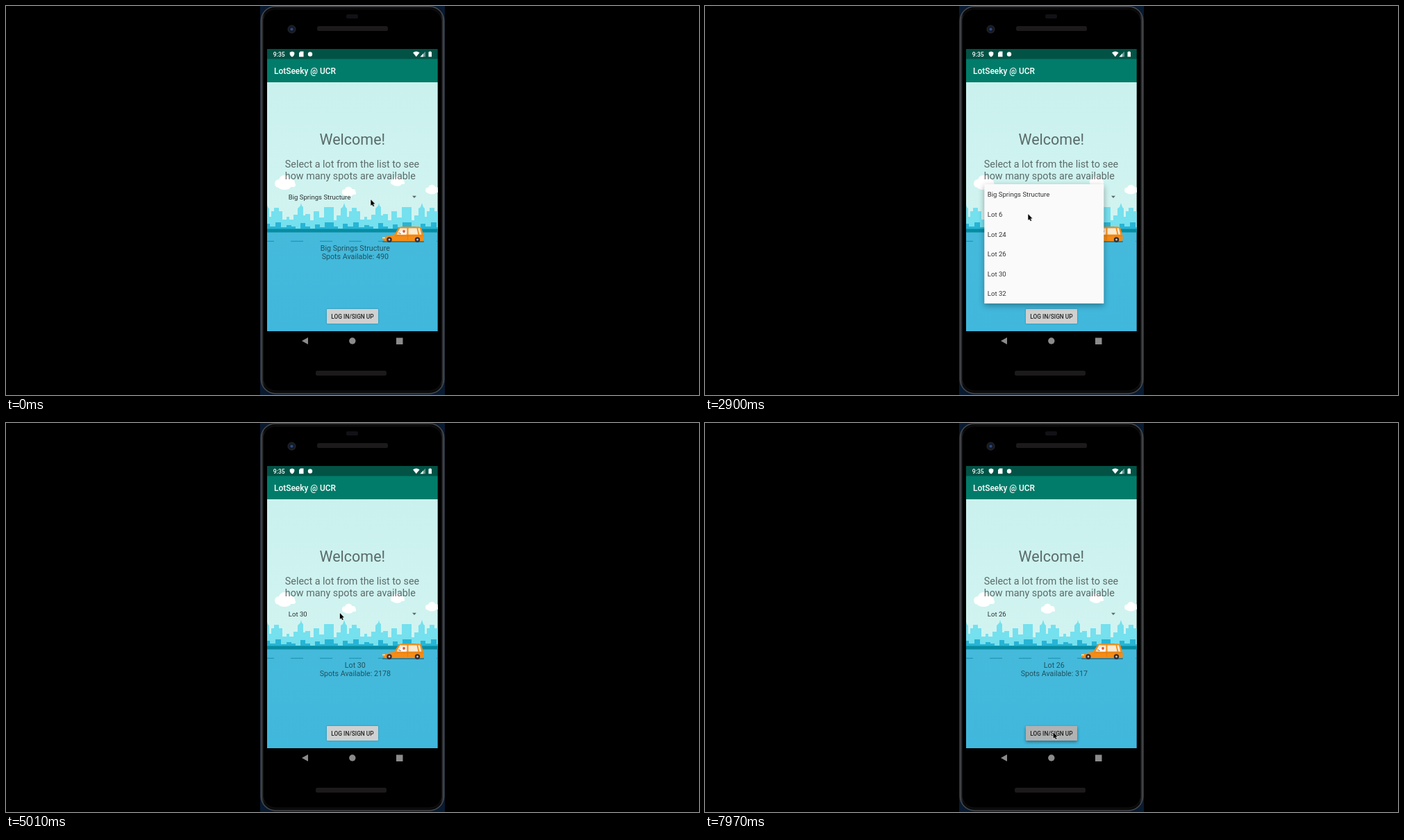
Animation of 998 by 561 pixels, one loop 8 s. Source, as an HTML page:

```html
<!DOCTYPE html>
<html lang="en">
<head>
<meta charset="utf-8">
<title>Parking lot picker</title>
<style>
  html, body { margin: 0; width: 100%; height: 100%; overflow: hidden; background: #000; }
  svg { display: block; width: 100vw; height: 100vh; }
  text { font-family: Roboto, sans-serif; white-space: pre; }
  .soft { fill: rgba(0,0,0,.56); }
  .ink { fill: rgba(0,0,0,.8); font-size: 9.57px; }
  .medium { font-weight: 500; }
  .heading { font-size: 21.5px; }
  .intro { font-size: 14.33px; }
  .result { font-size: 10.7px; text-anchor: middle; }

  .cursor, .popup, .sheet, .rows, .ripple, .button, .pick, .count {
    animation: 8s linear infinite;
  }

  .cursor { animation-name: cursor; animation-timing-function: ease-in-out; }
  @keyframes cursor {
    0%, 5% { transform: translate(525.3px, 279px); }
    19%, 25% { transform: translate(504.3px, 274px); }
    33%, 37% { transform: translate(465.3px, 300px); }
    44.5%, 48.2% { transform: translate(458px, 320px); }
    51.5%, 52.8% { transform: translate(478px, 275px); }
    56%, 57.2% { transform: translate(461px, 383px); }
    62.3%, 67% { transform: translate(480.8px, 274px); }
    76%, 82% { transform: translate(466.2px, 348px); }
    95%, 100% { transform: translate(501.6px, 446px); }
  }

  .popup { animation-name: popup; opacity: 0; }
  @keyframes popup {
    0%, 20.75% { opacity: 0; }
    22.5%, 46.25% { opacity: 1; }
    48.13%, 52.5% { opacity: 0; }
    54%, 57% { opacity: 1; }
    58.9%, 65.5% { opacity: 0; }
    67.2%, 79.6% { opacity: 1; }
    81.52%, 100% { opacity: 0; }
  }

  .sheet { animation-name: sheet; animation-timing-function: ease-out; }
  @keyframes sheet {
    0%, 20.75% { height: 60px; }
    23%, 23.05% { height: 167px; }
    24%, 50% { height: 172px; }
    50.01%, 52.5% { height: 60px; }
    55.5%, 62% { height: 172px; }
    62.01%, 65.5% { height: 60px; }
    68.5%, 100% { height: 172px; }
  }

  .rows { animation-name: rows; animation-timing-function: ease-out; }
  @keyframes rows {
    0%, 20.75% { transform: translate(1px, -30px); }
    23%, 23.05% { transform: translate(.6px, -2.5px); }
    24%, 50% { transform: none; }
    50.01%, 52.5% { transform: translate(1px, -30px); }
    55.5%, 62% { transform: none; }
    62.01%, 65.5% { transform: translate(1px, -30px); }
    68.5%, 100% { transform: none; }
  }

  .ripple { animation-name: ripple; opacity: 0; }
  @keyframes ripple {
    0%, 20% { opacity: 0; }
    21.5%, 23% { opacity: .1; }
    26%, 51.5% { opacity: 0; }
    53% { opacity: .1; }
    56%, 64.5% { opacity: 0; }
    66% { opacity: .1; }
    69%, 100% { opacity: 0; }
  }

  .button { animation-name: press; }
  @keyframes press {
    0%, 98.2% { fill: #cfd0d0; filter: drop-shadow(0 .7px .8px rgba(0,0,0,.3)); }
    99.4%, 100% { fill: #b1b2b2; filter: drop-shadow(0 2px 2px rgba(0,0,0,.4)); }
  }

  /* Each label is visible for its own slice of the loop. */
  .pick, .count { animation-timing-function: step-end; opacity: 0; }
  .pick.a { animation-name: pickA; }
  .pick.b { animation-name: pickB; }
  .pick.c { animation-name: pickC; }
  .pick.d, .count.d { animation-name: lastLot; }
  .count.a { animation-name: countA; }
  .count.b { animation-name: countB; }
  .count.c { animation-name: countC; }
  @keyframes pickA { 0% { opacity: 1; } 46.5%, 100% { opacity: 0; } }
  @keyframes pickB { 0% { opacity: 0; } 46.5% { opacity: 1; } 57.2%, 100% { opacity: 0; } }
  @keyframes pickC { 0% { opacity: 0; } 57.2% { opacity: 1; } 80.2%, 100% { opacity: 0; } }
  @keyframes lastLot { 0% { opacity: 0; } 80.2%, 100% { opacity: 1; } }
  @keyframes countA { 0% { opacity: 1; } 48.4%, 100% { opacity: 0; } }
  @keyframes countB { 0% { opacity: 0; } 48.4% { opacity: 1; } 58%, 100% { opacity: 0; } }
  @keyframes countC { 0% { opacity: 0; } 58% { opacity: 1; } 80.2%, 100% { opacity: 0; } }
</style>
</head>
<body>
<svg viewBox="0 0 998 561" preserveAspectRatio="none">
  <defs>
    <linearGradient id="sky" x2="0" y2="1">
      <stop stop-color="#caf1ee"/><stop offset="1" stop-color="#d2f4f1"/>
    </linearGradient>
    <linearGradient id="road" x2="0" y2="1">
      <stop stop-color="#45badb"/><stop offset="1" stop-color="#40b7dc"/>
    </linearGradient>
    <linearGradient id="rim">
      <stop stop-color="#4b4c4e"/><stop offset=".01" stop-color="#252628"/>
      <stop offset=".02" stop-color="#0a0a0b"/><stop offset=".98" stop-color="#0a0a0b"/>
      <stop offset=".99" stop-color="#252628"/><stop offset="1" stop-color="#4b4c4e"/>
    </linearGradient>
    <pattern id="city" x="411" y="280" width="112" height="46" patternUnits="userSpaceOnUse">
      <path fill="#75e0ee" d="M0 46V28H3V21H9V12L11 10L13 8L14 4L15 8L17 10V22H20V20H27V29H32V16H40V25H47V10H61V29H65V22H71V12L74 10L76 4L78 10L80 12V24H83V16H87V11H94V16H99V28H105V24H109V28H112V46Z"/>
      <path fill="#27b4d5" d="M0 46V38H6V41H13V33H20V38H27V41H34V35H41V39H48V32H61V38H67V41H74V34H81V38H89V32H97V39H105V36H112V46Z"/>
    </pattern>
    <g id="cloud" fill="#fff">
      <circle cx="-9" cy="1" r="6"/><circle cx="-1" cy="-3" r="8"/>
      <circle cx="8" cy="0" r="6"/><rect x="-13" y="0" width="28" height="6" rx="3"/>
      <ellipse cx="-1" cy="6" rx="9" ry="4"/>
    </g>
    <clipPath id="screen"><rect x="376" y="62" width="245.7" height="407"/></clipPath>
    <clipPath id="opening"><rect class="sheet" x="402" y="257" width="174" height="172"/></clipPath>
  </defs>

  <!-- Phone body -->
  <rect width="998" height="561"/>
  <rect x="366" width="266" height="561" fill="#081a30"/>
  <rect x="367.2" y=".7" width="263.6" height="558.3" rx="21" fill="url(#rim)" stroke="#48494c" stroke-width="1.4"/>
  <rect x="370.5" y="4.5" width="257" height="550.5" rx="18" fill="#000" stroke="#101112"/>
  <rect x="490" y="12" width="17" height="6" rx="2" fill="#111116"/>
  <rect x="448" y="29" width="102" height="7" rx="2.5" fill="#1c1a1b"/>
  <rect x="446" y="526" width="102" height="7" rx="2.5" fill="#1c1a1b"/>
  <circle cx="411.5" cy="33.5" r="5.5" fill="#171a24" stroke="#282b35"/>
  <circle cx="411.5" cy="33.5" r="2" fill="#294b83"/>

  <!-- Scenery -->
  <g clip-path="url(#screen)">
    <rect x="376" y="110" width="246" height="216" fill="url(#sky)"/>
    <use href="#cloud" x="402" y="255"/>
    <use href="#cloud" transform="translate(494 268) scale(.68)"/>
    <use href="#cloud" transform="translate(564 253) scale(.68)"/>
    <use href="#cloud" transform="translate(614 265) scale(.66)"/>
    <rect x="376" y="280" width="246" height="46" fill="url(#city)"/>
    <rect x="376" y="326" width="246" height="143" fill="url(#road)"/>
    <rect x="376" y="321.5" width="246" height="5" fill="#078ca2"/>
    <path d="M368 339.2H622" stroke="#168eaf" stroke-width="1.1" stroke-dasharray="18 24"/>
  </g>

  <!-- Car -->
  <g>
    <rect x="542" y="338.8" width="60" height="2" rx="1" fill="#297a91"/>
    <path fill="#f58c16" d="M542 334.5Q549 331 559 330L565 320.5Q566.5 318.3 570 318.3H594Q597.5 318.3 598.5 321L601 329.5Q602 332 601.5 337L600 339H546Q542.5 338 542 334.5Z"/>
    <path fill="#fbead0" d="M562.5 329.5L567.5 320.4H577.5V329.5ZM579.5 320.4H591.5L593.5 329.5H579.5ZM593.3 320.4H596L598.3 329.5H595.3Z"/>
    <path fill="#fff" d="M568 329.5V325.5Q572 321.5 576 325.5V329.5Z"/>
    <circle cx="573" cy="325" r="1.9" fill="#dc593b"/>
    <path d="M565 327L569 328.6" stroke="#8b5742" stroke-width=".8"/>
    <path d="M560 331.5H601M578.5 330V337.5" stroke="#da7611" stroke-width=".6"/>
    <rect x="542" y="333.6" width="4" height="1.6" fill="#fce1a5"/>
    <g fill="#372d32"><circle cx="552" cy="337" r="3.7"/><circle cx="592.5" cy="337" r="3.7"/></g>
    <g fill="#d9c5ae"><circle cx="552" cy="337" r="1.4"/><circle cx="592.5" cy="337" r="1.4"/></g>
  </g>

  <!-- Bars -->
  <rect x="376" y="76" width="245.7" height="34" fill="#027c6a"/>
  <rect x="376" y="62" width="245.7" height="14.5" fill="#025346"/>
  <g fill="#fff">
    <text class="medium" x="384.8" y="72.6" font-size="8.6">9:35</text>
    <path d="M412 65.5L415.3 66.8V69.5Q415 72 412 73.5Q409 72 408.7 69.5V66.8Z"/>
    <path d="M424 65.5H428.5V73.3H422V67.5Z"/>
    <circle cx="438" cy="69.5" r="3.2"/>
    <path d="M586 67.3Q590.8 63.8 595.6 67.3L590.8 73.2Z"/>
    <path opacity=".4" d="M604 65.5V73.3H596.5Z"/>
    <path d="M601 68.6V73.3H596.5Z"/>
    <path d="M608.5 66.3H609.6V65.4H611.9V66.3H613V73.3H608.5Z"/>
    <text class="medium" x="386" y="97.6" font-size="11.95">LotSeeky @ UCR</text>
  </g>
  <g fill="#8b8b8b">
    <path d="M426 483L435 478V488Z"/>
    <circle cx="498.8" cy="483" r="4.7"/>
    <rect x="562" y="478.5" width="9.5" height="9.5"/>
  </g>

  <!-- Page content -->
  <text class="soft heading" x="451.4" y="200">Welcome!</text>
  <g class="soft intro">
    <text x="401.8" y="233.4">Select a lot from the list to see</text>
    <text x="401.8" y="249.7">how many spots are available</text>
  </g>
  <g class="ink">
    <text class="pick a" x="406.8" y="279">Big Springs Structure</text>
    <text class="pick b" x="406.8" y="279">Lot 24</text>
    <text class="pick c" x="406.8" y="279">Lot 30</text>
    <text class="pick d" x="406.8" y="279">Lot 26</text>
  </g>
  <circle class="ripple" cx="588" cy="275" r="11"/>
  <path class="soft" d="M585 273.8H591L588 277Z"/>
  <g class="soft result">
    <g class="count a"><text x="502.8" y="352.7">Big Springs Structure</text><text x="502.8" y="365.2">Spots Available: 490</text></g>
    <g class="count b"><text x="502.8" y="352.7">Lot 24</text><text x="502.8" y="365.2">Spots Available: 412</text></g>
    <g class="count c"><text x="502.8" y="352.7">Lot 30</text><text x="502.8" y="365.2">Spots Available: 2178</text></g>
    <g class="count d"><text x="502.8" y="352.7">Lot 26</text><text x="502.8" y="365.2">Spots Available: 317</text></g>
  </g>
  <rect class="button" x="462" y="437" width="74" height="21" rx="1"/>
  <text class="medium" x="499" y="450.9" font-size="8.37" text-anchor="middle" fill="rgba(0,0,0,.84)">LOG IN/SIGN UP</text>

  <!-- Dropdown -->
  <g class="popup">
    <rect class="sheet" x="402.3" y="257" width="172" height="172" fill="#fafafa" style="filter:drop-shadow(0 3px 4px rgba(0,0,0,.35))"/>
    <g clip-path="url(#opening)">
      <g class="rows ink">
        <text x="406.8" y="275.4">Big Springs Structure</text>
        <text x="406.8" y="304">Lot 6</text>
        <text x="406.8" y="332.5">Lot 24</text>
        <text x="406.8" y="361.1">Lot 26</text>
        <text x="406.8" y="389.6">Lot 30</text>
        <text x="406.8" y="418.2">Lot 32</text>
      </g>
    </g>
  </g>

  <path class="cursor" d="M0 0V9L2 7.2L3.4 10.3L4.9 9.6L3.5 6.6H6.2Z" stroke="#fff" stroke-width="1.1" paint-order="stroke"/>
</svg>
</body>
</html>
```
